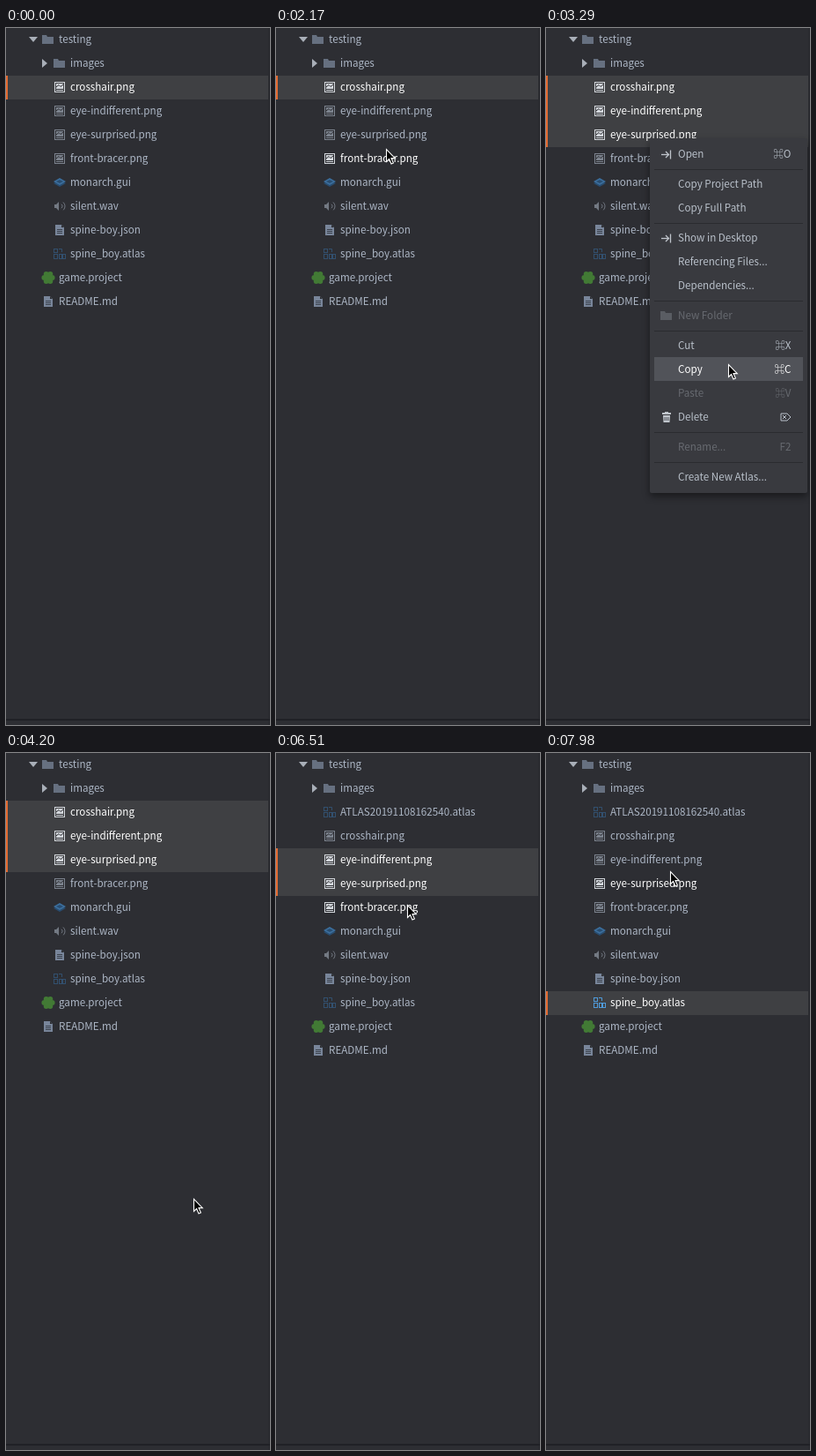
An HTML page with a canvas for the animation above (8 s loop, 300x790 px).

```html
<!DOCTYPE html>
<html lang="en">
<head>
<meta charset="utf-8">
<title>Asset browser</title>
<style>
html, body { margin: 0; width: 100%; height: 100%; overflow: hidden; background: #2d2e33; }
canvas { display: block; width: 300px; height: 790px; }
</style>
</head>
<body>
<canvas id="stage"></canvas>
<script>
const W = 300, H = 790, LOOP = 8000, STEP = 70, ROW = 27;
const canvas = document.getElementById('stage');
const ctx = canvas.getContext('2d');
const ratio = window.devicePixelRatio || 1;
canvas.width = W * ratio;
canvas.height = H * ratio;

const FONT = '11.65px "Noto Sans CJK JP", "Noto Sans CJK SC", "Noto Sans", sans-serif';
const BG = '#2d2e33', TEXT = '#adb7c6', WHITE = '#ffffff', ORANGE = '#e56b31';

// name, icon, indent level
const TREE = [
  ['testing', 'folder', 0, 'open'],
  ['images', 'folder', 1, 'closed'],
  ['crosshair.png', 'image', 1],
  ['eye-indifferent.png', 'image', 1],
  ['eye-surprised.png', 'image', 1],
  ['front-bracer.png', 'image', 1],
  ['monarch.gui', 'layers', 1],
  ['silent.wav', 'sound', 1],
  ['spine-boy.json', 'doc', 1],
  ['spine_boy.atlas', 'atlas', 1],
  ['game.project', 'project', 0],
  ['README.md', 'doc', 0]
];
const NEW_FILE = ['ATLAS20191108162540.atlas', 'atlas', 1];
const NEW_AT = 4270;

const SELECTED = [
  [0, 'crosshair.png'],
  [2590, 'crosshair.png', 'eye-indifferent.png', 'eye-surprised.png'],
  [5390, 'eye-surprised.png'],
  [5880, 'eye-indifferent.png', 'eye-surprised.png'],
  [6580, 'eye-indifferent.png', 'eye-surprised.png', 'front-bracer.png'],
  [7070, 'spine_boy.atlas']
];

const MENU = { x: 118, y: 125, w: 179, h: 402, from: 2800, to: 3850 };
// centre y, label, shortcut, icon, disabled
const ITEMS = [
  [143, 'Open', '⌘O', 'enter'],
  [177, 'Copy Project Path'],
  [204, 'Copy Full Path'],
  [238, 'Show in Desktop', '', 'enter'],
  [265, 'Referencing Files...'],
  [292, 'Dependencies...'],
  [326, 'New Folder', '', 'folder', true],
  [360, 'Cut', '⌘X'],
  [387, 'Copy', '⌘C'],
  [414, 'Paste', '⌘V', '', true],
  [441, 'Delete', 'del', 'trash'],
  [475, 'Rename...', 'F2', '', true],
  [509, 'Create New Atlas...']
];
const RULES = [160, 221, 309, 343, 458, 492];

// time, x, y of the pointer tip
const PATH = [
  [70, 172, 776], [350, 160, 400], [840, 130, 95],
  [1190, 128, 290], [1680, 125, 60], [1890, 125, 290],
  [2170, 125, 137], [2520, 118, 122], [2870, 118, 126],
  [3290, 207, 381], [3710, 213, 505], [4550, 213, 505],
  [5320, 148, 150], [5530, 145, 145], [5880, 149, 118],
  [6510, 149, 172], [7000, 150, 283], [7420, 150, 283],
  [7980, 141, 134]
];

function pointer(t) {
  if (t < PATH[0][0]) return null;
  const i = PATH.findIndex(p => p[0] > t);
  if (i < 0) return PATH[PATH.length - 1].slice(1);
  const [t0, x0, y0] = PATH[i - 1], [t1, x1, y1] = PATH[i];
  const u = (t - t0) / (t1 - t0), e = u * u * (3 - 2 * u);
  return [x0 + (x1 - x0) * e, y0 + (y1 - y0) * e];
}

function rect(x, y, w, h, color) {
  ctx.fillStyle = color;
  ctx.fillRect(x, y, w, h);
}

function poly(points, color) {
  ctx.beginPath();
  for (let i = 0; i < points.length; i += 2) ctx.lineTo(points[i], points[i + 1]);
  ctx.closePath();
  ctx.fillStyle = color;
  ctx.fill();
}

function line(points, color, width = 1) {
  ctx.beginPath();
  for (let i = 0; i < points.length; i += 2) ctx.lineTo(points[i], points[i + 1]);
  ctx.strokeStyle = color;
  ctx.lineWidth = width;
  ctx.stroke();
}

function frame(x, y, w, h, color) {
  ctx.strokeStyle = color;
  ctx.lineWidth = 1;
  ctx.strokeRect(x + 0.5, y + 0.5, w - 1, h - 1);
}

function text(str, x, y, color, align = 'left') {
  ctx.textAlign = align;
  ctx.fillStyle = color;
  ctx.fillText(str, x, y);
}

// Icons are drawn around the origin.
const ICONS = {
  folder(lit, color = '#667080') {
    poly([-7, -5, -2, -5, -1, -3, 6, -3, 6, 5, -7, 5], color);
  },
  image(lit) {
    const c = lit ? '#d3d7dc' : '#7c838e';
    frame(-6, -6, 12, 12, c);
    rect(-4, -4, 8, 8, c);
    line([-4, 0, -1, -2.5, 1, -0.5, 4, -3], BG);
    line([-4, 2.5, 4, 2.5], BG);
  },
  layers() {
    poly([-7, 1, 0, -2, 7, 1, 0, 5], '#294d70');
    poly([-7, -1, 0, -5, 7, -1, 0, 3], '#3c6f9e');
    poly([-4, -1, 0, -3, 4, -1, 0, 1], '#294d70');
  },
  sound(lit) {
    const c = lit ? '#c5cad1' : '#737983';
    poly([-6, -2, -4, -2, -1, -5, -1, 5, -4, 2, -6, 2], c);
    ctx.strokeStyle = c;
    ctx.lineWidth = 1;
    for (const r of [3, 6]) {
      ctx.beginPath();
      ctx.arc(0, 0, r, -0.85, 0.85);
      ctx.stroke();
    }
  },
  doc(lit) {
    const c = lit ? '#c5cad1' : '#78859a';
    poly([-5, -6, 2, -6, 5, -3, 5, 6, -5, 6], c);
    poly([2, -6, 2, -3, 5, -3], BG);
    for (const y of [-1, 1, 3]) rect(-3, y, 6, 1, '#3b424d');
  },
  atlas(lit) {
    const c = lit ? '#4f9bdb' : '#32506f';
    frame(-7, -6, 5, 5, c);
    frame(-7, 0, 5, 6, c);
    frame(-1, 0, 4, 6, c);
    frame(3, 0, 4, 6, c);
    line([-1, -5.5, 2.5, -5.5, 2.5, -2], c);
  },
  project() {
    ctx.fillStyle = '#427a35';
    ctx.beginPath();
    for (let i = 0; i < 6; i++) {
      const a = i * Math.PI / 3, x = 4.6 * Math.cos(a), y = 4.6 * Math.sin(a);
      ctx.moveTo(x + 3, y);
      ctx.arc(x, y, 3, 0, 7);
    }
    ctx.fill();
    ctx.beginPath();
    ctx.arc(0, 0, 5, 0, 7);
    ctx.fill();
  },
  enter() {
    line([-6, 0.5, 2, 0.5], '#c0c5cc', 1.3);
    line([-1, -3, 2.5, 0.5, -1, 4], '#c0c5cc', 1.3);
    line([4.5, -4.5, 4.5, 5.5], '#c0c5cc', 1.3);
  },
  trash() {
    const c = '#c0c5cc';
    rect(-2, -6, 4, 1, c);
    rect(-5, -5, 10, 2, c);
    poly([-4, -2, 4, -2, 3.5, 6, -3.5, 6], c);
    for (const x of [-2, 0, 2]) rect(x - 0.5, 0, 1, 4, '#55585e');
  }
};

function icon(name, x, y, ...args) {
  ctx.save();
  ctx.translate(x, y);
  ICONS[name](...args);
  ctx.restore();
}

function drawTree(t, tip) {
  const rows = TREE.slice();
  if (t >= NEW_AT) rows.splice(2, 0, NEW_FILE);
  const chosen = SELECTED.filter(s => s[0] <= t).pop();
  const over = tip ? Math.floor((tip[1] + 1) / ROW) : -1;
  rows.forEach(([name, kind, level, arrow], i) => {
    const y = 13 + i * ROW, x = 48 + level * 13;
    const picked = chosen.includes(name), lit = picked || i === over;
    if (picked) {
      rect(0, y - 13, 298, ROW, '#3f4043');
      rect(0, y - 13, 2, ROW, ORANGE);
    }
    if (arrow === 'open') poly([26, 10, 36, 10, 31, 16], '#a9afb8');
    if (arrow === 'closed') poly([41, y - 5, 47, y, 41, y + 5], '#a9afb8');
    icon(kind, x, y, lit);
    text(name, x + 12, y + 4, lit ? WHITE : TEXT);
  });
}

function drawMenu(tip) {
  const { x, y, w, h } = MENU;
  ctx.save();
  ctx.shadowColor = 'rgba(0,0,0,.45)';
  ctx.shadowBlur = 8 * ratio;
  ctx.shadowOffsetY = 4 * ratio;
  ctx.beginPath();
  ctx.roundRect(x, y, w, h, 2);
  ctx.fillStyle = '#393a3f';
  ctx.fill();
  ctx.restore();
  for (const r of RULES) rect(x + 5, r, w - 10, 1, '#2a2b2f');
  for (const [cy, label, keys, kind, off] of ITEMS) {
    const hot = !off && Math.abs(tip[1] - cy) < 13.5 && tip[0] > x;
    const color = off ? '#676a70' : hot ? WHITE : '#b9c0ca';
    if (hot) rect(x + 5, cy - 14, w - 10, ROW, '#515359');
    if (kind) icon(kind, 137, cy, false, '#5a5d63');
    text(label, 150, cy + 4, color);
    if (keys === 'del') {
      line([267, cy - 4, 274, cy - 4, 278, cy, 274, cy + 4, 267, cy + 4, 267, cy - 4], color);
      line([269, cy - 2, 273, cy + 2], color);
      line([273, cy - 2, 269, cy + 2], color);
    } else if (keys) {
      text(keys, 278.5, cy + 4, color, 'right');
    }
  }
}

function drawPointer([x, y]) {
  ctx.save();
  ctx.translate(Math.round(x), Math.round(y));
  ctx.lineJoin = 'miter';
  ctx.beginPath();
  const p = [0.5, 0.5, 0.5, 14.5, 3.6, 11.5, 6, 17, 8.4, 16, 6, 10.6, 10.3, 10.6];
  for (let i = 0; i < p.length; i += 2) ctx.lineTo(p[i], p[i + 1]);
  ctx.closePath();
  ctx.fillStyle = '#000';
  ctx.fill();
  ctx.strokeStyle = WHITE;
  ctx.lineWidth = 1.1;
  ctx.stroke();
  ctx.restore();
}

function draw(now) {
  const t = Math.floor(now % LOOP / STEP) * STEP;
  const tip = pointer(t);
  const menuOpen = t >= MENU.from && t < MENU.to;
  ctx.setTransform(ratio, 0, 0, ratio, 0, 0);
  ctx.font = FONT;
  rect(0, 0, W, H, BG);
  rect(298, 0, 2, H, '#292a2f');
  rect(0, 783, W, 2, '#202126');
  drawTree(t, menuOpen ? null : tip);
  if (menuOpen) drawMenu(tip);
  if (tip) drawPointer(tip);
}

const start = performance.now();
function tick() {
  draw(performance.now() - start);
  requestAnimationFrame(tick);
}
draw(0);
requestAnimationFrame(tick);
</script>
</body>
</html>
```
